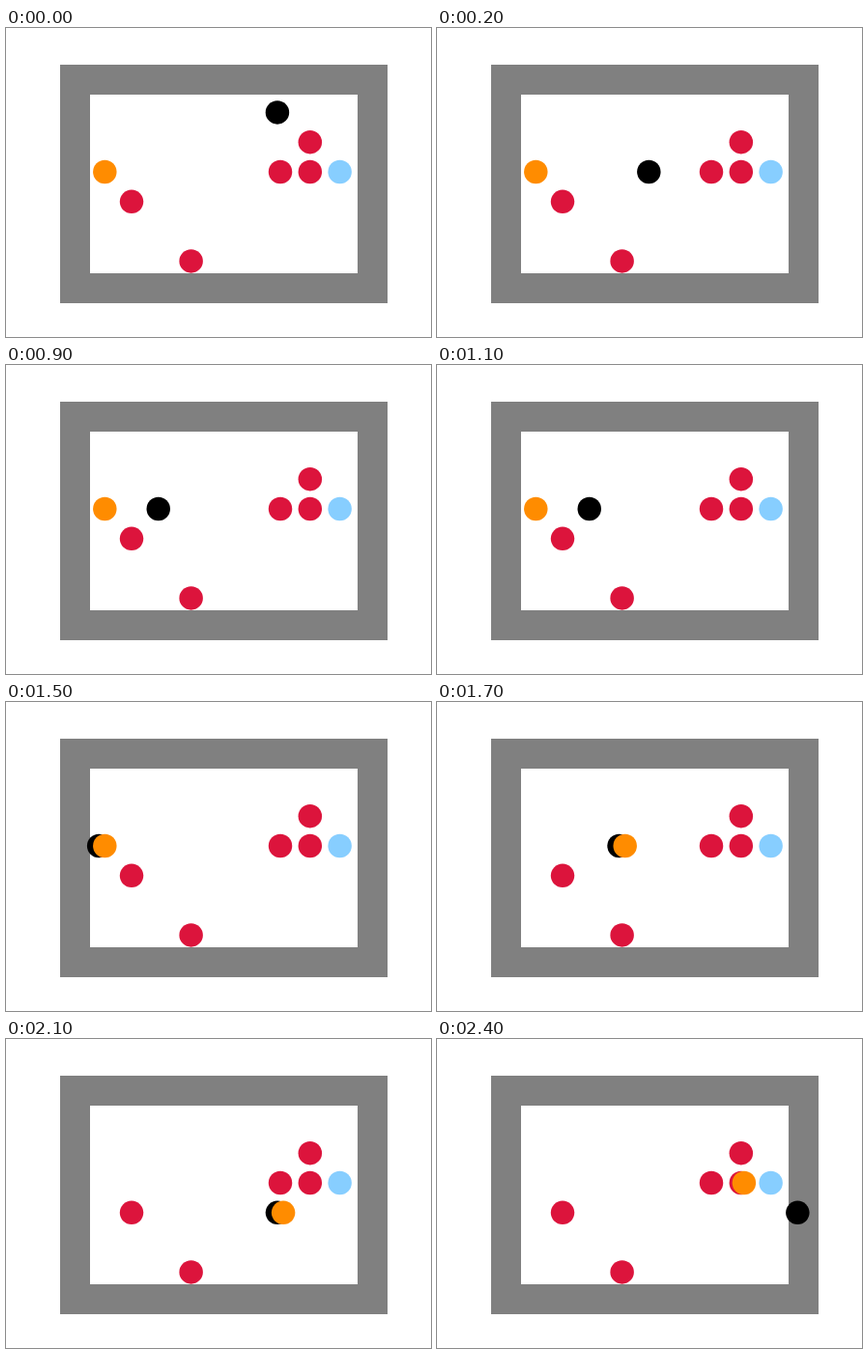
An HTML page with a canvas that plays this animation: 440x320 px, repeating every 2.5 s.

```html
<!DOCTYPE html>
<html lang="en">
<head>
<meta charset="utf-8">
<title>Grid carrier</title>
<style>
  html, body { margin: 0; width: 100%; height: 100%; overflow: hidden; background: #fff; }
  canvas { display: block; }
</style>
</head>
<body>
<canvas id="stage" width="440" height="320"></canvas>
<script>
const ctx = document.getElementById('stage').getContext('2d');
const CELL = 30.8, LEFT = 56.1, TOP = 41.2, RADIUS = 12.25;
const STEP = 100, LOOP = 2500;
const REDS = [[8, 2], [7, 3], [8, 3], [2, 4], [4, 6]];
const GOAL = [9, 3], ITEM = [1, 3], DROP = [8, 3];
const PICK_STEP = 15, DROP_STEP = 22;

// Agent cell at each step
const PATH = [
  [7, 1], [6, 2], [5, 3], [4, 3], [3, 3], [2, 3], [2, 3],
  [3, 3], [2, 3], [3, 3], [2, 3], [3, 3], [3, 3],
  [2, 3], [1, 3], [1, 3], [2, 3], [4, 3], [5, 3],
  [5, 4], [6, 4], [7, 4], [8, 3], [9, 4], [10, 4]
];

function ball([col, row], color, shift) {
  ctx.fillStyle = color;
  ctx.beginPath();
  ctx.arc(LEFT + (col + 0.5 - shift) * CELL, TOP + (row + 0.5) * CELL, RADIUS, 0, Math.PI * 2);
  ctx.fill();
}

function rect(color, x, y, w, h) {
  ctx.fillStyle = color;
  ctx.fillRect(x, y, w, h);
}

function draw(step) {
  rect('#fff', 0, 0, 440, 320);
  rect('#808080', 56, 38, 339, 247);
  rect('#fff', 87, 69, 277, 185);
  REDS.forEach(cell => ball(cell, '#dc143c', 0.1));
  ball(GOAL, '#87ceff', 0.1);

  const agent = PATH[step];
  const item = step < PICK_STEP ? ITEM : step < DROP_STEP ? agent : DROP;
  const drawItem = () => ball(item, '#ff8c00', 0);
  const drawAgent = () => ball(agent, '#000', 0.2);
  // The item covers the agent once it is picked up
  if (step < PICK_STEP) { drawItem(); drawAgent(); }
  else { drawAgent(); drawItem(); }
}

const start = performance.now();
function tick() {
  const t = (performance.now() - start) % LOOP;
  draw(Math.floor(t / STEP));
  requestAnimationFrame(tick);
}
tick();
</script>
</body>
</html>
```
